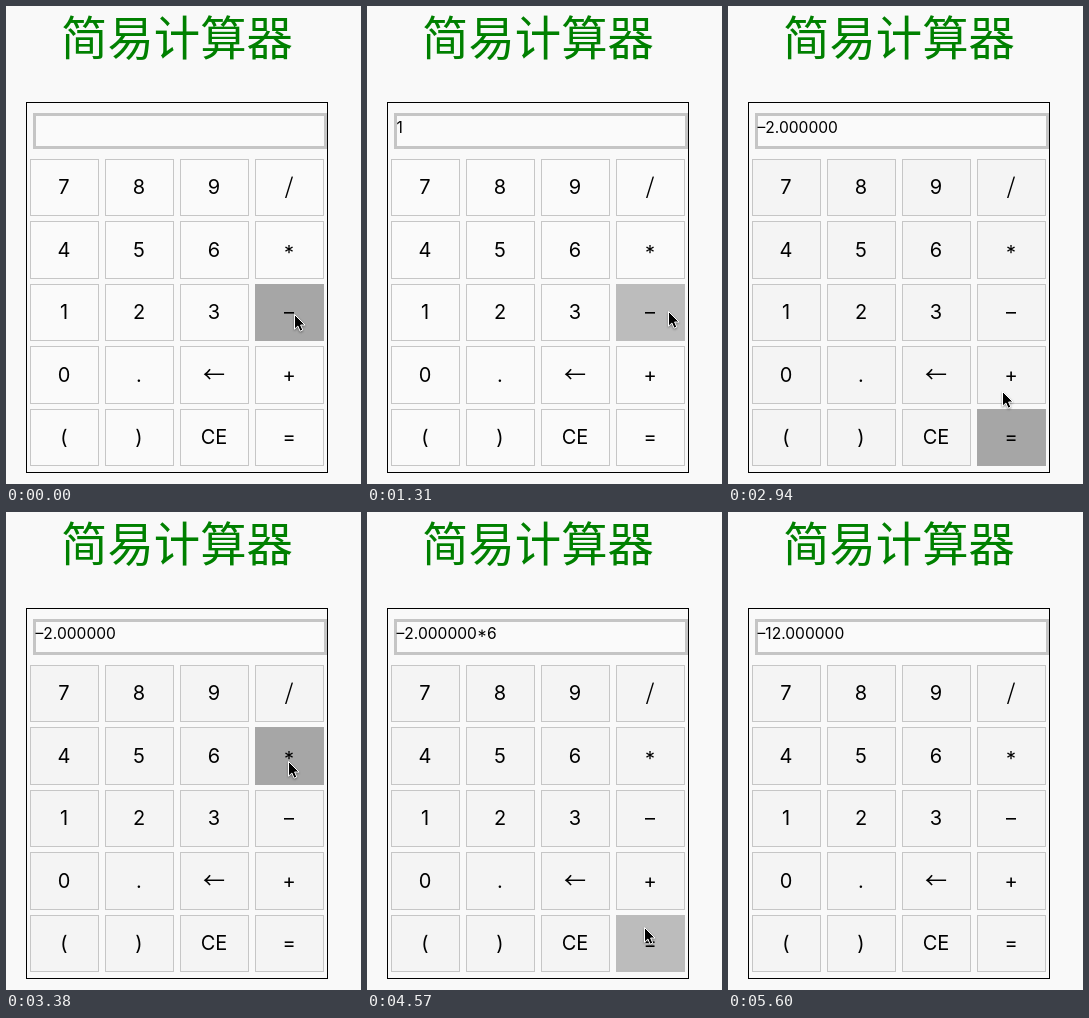
An HTML page that plays this animation: 355x478 px, repeating every 5760 ms.

```html
<!DOCTYPE html>
<html lang="zh">
<head>
<meta charset="utf-8">
<title>简易计算器</title>
<style>
html, body { margin: 0; width: 100%; height: 100%; overflow: hidden; background: #f9f9f9; }
svg { display: block; width: 355px; height: 478px; }
text { font-family: Inter, "Liberation Sans", sans-serif; fill: #000; }
.title { font: 46.4px "Noto Sans CJK SC", "Noto Sans CJK", sans-serif; fill: #008000; }
.mid { text-anchor: middle; }
.key { font-size: 20px; }
.wide { font: 22px "Noto Sans CJK SC", "Noto Sans CJK", sans-serif; }
#out { font-size: 15.6px; white-space: pre; }
#arrow { filter: drop-shadow(0 1px 1px #0006); }
</style>
</head>
<body>
<svg viewBox="0 0 355 478">
  <defs><path id="bar" d="M-3-8Q0-8 0-6Q0-8 3-8M0-6V6M-3 8Q0 8 0 6Q0 8 3 8M-2 2H2"/></defs>
  <text class="title mid" x="171" y="49">简易计算器</text>
  <rect x="20.5" y="96.5" width="301" height="370" fill="none" stroke="#000"/>
  <rect x="28.5" y="108.5" width="291" height="33" fill="#fafafa" stroke="#c5c5c5" stroke-width="3"/>
  <text id="out" x="29.5" y="126.5"></text>
  <g id="keys"></g>
  <path id="arrow" d="M.5 .5V15.2L3.9 12 6.1 17.2 8.8 16 6.6 11H11Z" fill="#000" stroke="#fff" stroke-linejoin="round"/>
  <g id="beam" fill="none">
    <use href="#bar" stroke="#fff" stroke-width="2.6"/>
    <use href="#bar" stroke="#222" stroke-width="1.1"/>
  </g>
</svg>
<script>
const LOOP = 5760, FIRST = 274, STEP = 147.5, LAST = 37;
const LABELS = [...'789/456*123–0.←+()', 'CE', '='];
const PRESSES = [5, 10, 13, 17, 23, 27, 34];
const BEAM_FROM = 31, EXIT = 35;

// step and pointer tip at each turn of the route
const ROUTE = [
  [0, 289, 309], [3, 62, 314], [5, 58, 314], [8, 302, 306], [10, 287, 309],
  [12, 209, 312], [13, 209, 312], [14, 275, 377], [15, 280, 418], [18, 281, 422],
  [19, 275, 386], [21, 283, 250], [23, 283, 250], [24, 228, 250], [27, 209, 256],
  [28, 247, 325], [30, 278, 416], [34, 280, 424], [EXIT, 283, 464]
];

const $ = id => document.getElementById(id);
const out = $('out'), arrow = $('arrow'), beam = $('beam');

function add(tag, attrs) {
  const el = document.createElementNS('http://www.w3.org/2000/svg', tag);
  for (const name in attrs) el.setAttribute(name, attrs[name]);
  return $('keys').appendChild(el);
}

const keys = LABELS.map((label, i) => {
  const x = 24 + (i % 4) * 75, drop = (i >> 2) * 62.5;
  const top = Math.floor(153 + drop), bottom = Math.ceil(210 + drop);
  const box = add('rect', { x: x + .5, y: top + .5, width: 68, height: bottom - top - 1 });
  const text = add('text', {
    class: '/←'.includes(label) ? 'wide mid' : 'key mid',
    x: x + 34, y: 188 + drop + (label === '*' ? 3 : 0)
  });
  text.textContent = label;
  return { label, x, top, bottom, box };
});

function pointer(k) {
  const n = ROUTE.findIndex(p => p[0] > k);
  if (n < 0) return ROUTE[ROUTE.length - 1].slice(1);
  const [from, x, y] = ROUTE[n - 1], [to, x2, y2] = ROUTE[n];
  const f = (k - from) / (to - from);
  return [Math.round(x + (x2 - x) * f), Math.round(y + (y2 - y) * f)];
}

function keyUnder(k) {
  const [x, y] = pointer(Math.max(0, k));
  return keys.find(b => x >= b.x && x < b.x + 69 && y >= b.top && y < b.bottom);
}

// keys the pointer only passes over do not light up
function restingOn(k) {
  const key = keyUnder(k);
  return key === keyUnder(k - 1) || key === keyUnder(k + 1) ? key : null;
}

// the highlight trails the pointer by one step, with a half shade either side
function shade(key, k) {
  if (restingOn(k - 1) === key) return '#a6a6a6';
  return restingOn(k) === key || restingOn(k - 2) === key ? '#bcbcbc' : null;
}

function solve(text) {
  const [, a, op, b] = text.match(/^(–?[\d.]+)([–*])(.+)$/);
  const left = Number(a.replace('–', '-'));
  const value = op === '*' ? left * b : left - b;
  return value.toFixed(6).replace('-', '–');
}

function display(k) {
  return PRESSES.filter(p => p <= k)
    .map(p => keyUnder(p).label)
    .reduce((text, label) => label === '=' ? solve(text) : text + label, '');
}

function draw(k) {
  out.textContent = display(k);
  for (const key of keys) {
    const dark = shade(key, k);
    key.box.setAttribute('fill', dark || (k < 9 ? '#fafafa' : '#f4f4f4'));
    key.box.setAttribute('stroke', dark || '#c6c6c6');
  }
  const onText = k >= BEAM_FROM && k < EXIT;
  arrow.style.display = onText || k > EXIT ? 'none' : '';
  beam.style.display = onText ? '' : 'none';
  const [x, y] = pointer(k);
  arrow.setAttribute('transform', `translate(${x - 1} ${y - 1})`);
  beam.setAttribute('transform', `translate(${x - 1.5} ${y + 8})`);
}

const start = performance.now();
let shown = -1;
function tick() {
  const t = (performance.now() - start) % LOOP;
  const k = t < FIRST ? 0 : Math.min(LAST, 1 + Math.floor((t - FIRST) / STEP));
  if (k !== shown) draw(shown = k);
  requestAnimationFrame(tick);
}
tick();
</script>
</body>
</html>
```
